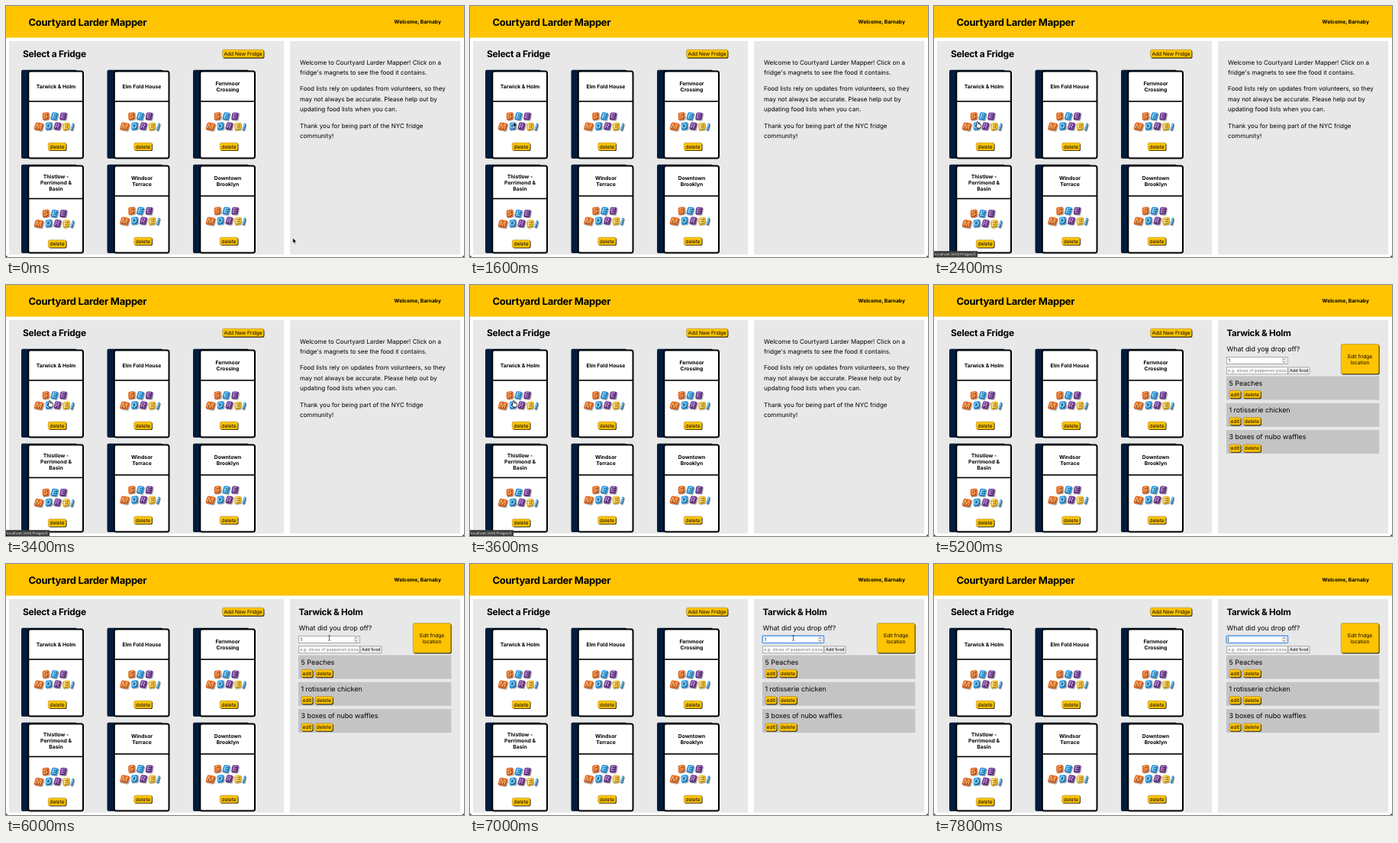
An HTML page for the animation above (8000 ms loop, 600x329 px).

```html
<!DOCTYPE html>
<html lang="en">
<head>
<meta charset="utf-8">
<title>Larder list</title>
<style>
  html, body { margin: 0; width: 100%; height: 100%; overflow: hidden; background: #fff; }
  svg { display: block; font-family: Inter, Roboto, sans-serif; text-rendering: geometricPrecision; }
  text { white-space: pre; }
</style>
</head>
<body>
<svg id="stage" width="600" height="329" viewBox="0 0 600 329"></svg>
<script>
const LOOP = 8000;
const GOLD = '#ffc300', NAVY = '#001d3d', PANEL = '#e8e8e8';
const stage = document.getElementById('stage');

const rect = (x, y, w, h, fill, more = '') =>
  `<rect x="${x}" y="${y}" width="${w}" height="${h}" fill="${fill}" ${more}/>`;

// y is the middle of the capitals
const text = (s, x, y, size, more = '') =>
  `<text x="${x}" y="${y + size * 0.36}" font-size="${size}" ${more}>${s.replace(/&/g, '&amp;')}</text>`;

const lines = (list, x, y, step, size, more) =>
  list.map((s, i) => text(s, x, y + (i - (list.length - 1) / 2) * step, size, more)).join('');

const middle = 'text-anchor="middle"';
const heading = (s, x, y, size = 12) =>
  text(s, x, y, size, 'font-weight="700" letter-spacing="-.27"');

const button = (label, x, y, w, h) =>
  rect(x + 0.8, y + 0.9, w, h, '#111', 'rx="2"') +
  rect(x, y, w, h, GOLD, 'rx="2" stroke="#7a6420" stroke-width=".4"') +
  lines(label.split('|'), x + w / 2, y + h / 2 + 0.2, 8, 6.6, middle);

const ORANGE = ['#e2661f', '#ffa45c'], BLUE = ['#2490d6', '#8fd4fa'],
      PURPLE = ['#693590', '#b483d2'], YELLOW = ['#eeb111', '#ffe48a'];
const magnets = [
  ['S', 52, 0, ORANGE, -8], ['E', 63.5, 0, BLUE, 10], ['E', 75, 0, PURPLE, 4],
  ['M', 43, 13.5, ORANGE, 10], ['O', 56, 13, BLUE, -6], ['R', 67.5, 13, PURPLE, 8],
  ['E', 78.5, 13.5, YELLOW, -8], ['!', 87, 14, BLUE, 8]
];

const magnet = ([ch, x, y, [dark, light], turn]) => {
  const w = { M: 11, '!': 3 }[ch] || 8.5;
  return `<g transform="translate(${x} ${y}) rotate(${turn}) skewX(-6)">` +
    rect(-w / 2 + 0.8, -4.2, w + 0.6, 10.2, '#77777799', 'rx="2"') +
    rect(-w / 2, -5, w, 10, dark, 'rx="2"') +
    text(ch, 0.5, 0.5, 9.4, `${middle} font-weight="800" fill="#222" fill-opacity=".6"`) +
    text(ch, -0.4, -0.3, 9.4, `${middle} font-weight="800" fill="${light}"`) + '</g>';
};

function fridge(name, col, row) {
  const label = name.split('|');
  const split = (row ? 41 : 41) + (label.length > 2 ? 3.5 : 0);
  return `<g transform="translate(${col * 112.5} ${84 + row * 124})">` +
    rect(20, -0.3, 73, 116.3, NAVY, 'rx="2"') +
    rect(29.3, 1.5, 71.7, 114, '#fff', 'rx="2.5" stroke="#000" stroke-width="2"') +
    rect(29, split - 0.8, 72, 1.6, '#000') +
    lines(label, 65.5, split / 2 + 1.2, 8, 6.8, middle + ' font-weight="700"') +
    `<g transform="translate(0 ${split + 19.5})">${magnets.map(magnet).join('')}</g>` +
    button('delete', 55.3, split + 54.2, 23.4, 10) + '</g>';
}

const foods = y => ['5 Peaches', '1 rotisserie chicken', '3 boxes of nubo waffles'].map((s, i) => {
  const top = y + i * 35.3;
  return rect(383, top, 200.3, 31, '#c4c4c4') +
    text(s, 386.5, top + 9, 8.9) +
    button('edit', 387, top + 18.8, 14.7, 10) +
    button('delete', 405, top + 18.8, 23, 10);
}).join('');

const group = (id, body) => `<g id="${id}">${body}</g>`;
const field = (y, more) => rect(383.4, y, 79.8, 9, '#fff', more);
const plain = 'stroke="#777" stroke-width=".6"';
const spinner = '<rect x="456" y="95.2" width="5" height="7.2" rx="1.5" fill="#eee" stroke="#bbb" stroke-width=".4"/>' +
  '<path d="M457.2 98l1.3-1.5 1.3 1.5M457.2 99.8l1.3 1.5 1.3-1.5" fill="none" stroke="#555" stroke-width=".6"/>';

const welcome = ['Welcome to Courtyard Larder Mapper! Click on a', 'fridge\'s magnets to see the food it contains.',
  'Food lists rely on updates from volunteers, so they', 'may not always be accurate. Please help out by',
  'updating food lists when you can.',
  'Thank you for being part of the NYC fridge', 'community!'];
const welcomeY = [73.7, 87.2, 108.3, 121.8, 135.3, 156.7, 170.2];

const names = ['Tarwick & Holm', 'Elm Fold House', 'Fernmoor|Crossing',
  'Thistlow -|Perrimond &|Basin', 'Windsor|Terrace', 'Downtown|Brooklyn'];

stage.innerHTML =
  rect(0, 0, 600, 329, '#fff') +
  rect(0, 0, 600, 41.5, GOLD) +
  heading('Courtyard Larder Mapper', 29.5, 21, 13) +
  text('Welcome, Barnaby', 570, 21, 6.7, 'font-weight="700" text-anchor="end"') +
  rect(4, 46, 360, 279.7, PANEL) +
  rect(372, 46, 223, 279.7, PANEL) +
  heading('Select a Fridge', 22, 62.7) +
  button('Add New Fridge', 283.6, 57.2, 54, 10.6) +
  names.map((n, i) => fridge(n, i % 3, Math.floor(i / 3))).join('') +
  group('intro', welcome.map((s, i) => text(s, 385, welcomeY[i], 8)).join('')) +
  group('detail', heading('Tarwick & Holm', 383.5, 62.7, 11.6)) +
  group('list', button('Add Food', 409.3, 77.3, 34, 19) +
    button('Edit fridge|location', 495.3, 77.3, 62, 19) + foods(98.3)) +
  group('form', text('What did you drop off?', 383.5, 84, 8.9) +
    field(94.3, plain) +
    group('focus', field(94.3, 'rx="1" stroke="#8fc0f5" stroke-width="2.6"') +
      field(94.3, 'rx=".5" stroke="#2f7fdc" stroke-width=".8"')) +
    spinner +
    group('amount', text('1', 385.5, 99, 6)) +
    group('caret', rect(385.3, 95.5, 0.6, 6.8, '#000')) +
    field(107.8, plain) +
    text('e.g. slices of pepperoni pizza', 385, 112.2, 5.55, 'fill="#777"') +
    rect(464, 107.8, 28.2, 9, '#efefef', 'rx="1" stroke="#777" stroke-width=".6"') +
    text('Add food', 478.1, 112.2, 5.6, middle) +
    button('Edit fridge|location', 533.2, 77.5, 49.6, 39) + foods(119.5)) +
  group('status', rect(0, 321.2, 57, 8, '#3b3b3b') +
    text('localhost:3000/fridges/5', 1, 325, 4.6, 'fill="#eee"')) +
  '<path d="M0 325.5Q0 329 3.5 329H0ZM600 325.5Q600 329 596.5 329H600Z"/>' +
  group('pointer',
    '<path id="arrow" d="M0 0V7L1.6 5.6 2.7 8.1 3.9 7.6 2.8 5.1H5Z" fill="#000" stroke="#fff" stroke-width=".6"/>' +
    '<path id="hand" d="M-1 0Q0-1 1 0V2.5L4 3.2Q5 3.6 4.8 5L4 8H0L-2.6 4.6Q-2.4 3.6-1 4.6Z" fill="#fff" stroke="#000" stroke-width=".7"/>' +
    '<path id="beam" d="M-1.3-3.4Q0-3.4 0-2.6Q0-3.4 1.3-3.4M0-2.6V2.6M-1.3 3.4Q0 3.4 0 2.6Q0 3.4 1.3 3.4" fill="none" stroke="#222" stroke-width=".7"/>');

const part = {};
stage.querySelectorAll('[id]').forEach(el => part[el.id] = el);
const show = (id, on) => part[id].style.display = on ? '' : 'none';

// time, x, y of the pointer
const path = [[0, 375.7, 304], [450, 375.7, 304], [1400, 57, 152], [3750, 57, 152],
  [4400, 415, 142], [4650, 427, 86], [5000, 427, 86], [5200, 436, 86],
  [5400, 436, 86], [6000, 423.5, 97], [LOOP, 423.5, 97]];

function pointerAt(t) {
  const i = path.findIndex(p => p[0] > t);
  const [t0, x0, y0] = path[i - 1], [t1, x1, y1] = path[i];
  const u = (t - t0) / (t1 - t0), k = u * u * (3 - 2 * u);
  return [x0 + (x1 - x0) * k, y0 + (y1 - y0) * k];
}

function draw(t) {
  const opened = t >= 3800, form = t >= 5000, focus = t >= 6200, typed = t >= 7800;
  show('intro', !opened);
  show('detail', opened);
  show('list', opened && !form);
  show('form', form);
  show('focus', focus);
  show('amount', !typed);
  show('caret', typed || (focus && (t - 6200) % 1000 < 500));
  show('status', t >= 1800 && !opened);

  const hand = (t >= 1700 && t < 3850) || (t >= 4550 && !form);
  const beam = (t >= 4300 && t < 4550) || form;
  show('hand', hand);
  show('beam', beam);
  show('arrow', !hand && !beam);
  show('pointer', !typed);
  part.pointer.setAttribute('transform', `translate(${pointerAt(t)})`);
}

const start = performance.now();
function tick() {
  draw((performance.now() - start) % LOOP);
  requestAnimationFrame(tick);
}
tick();
</script>
</body>
</html>
```
